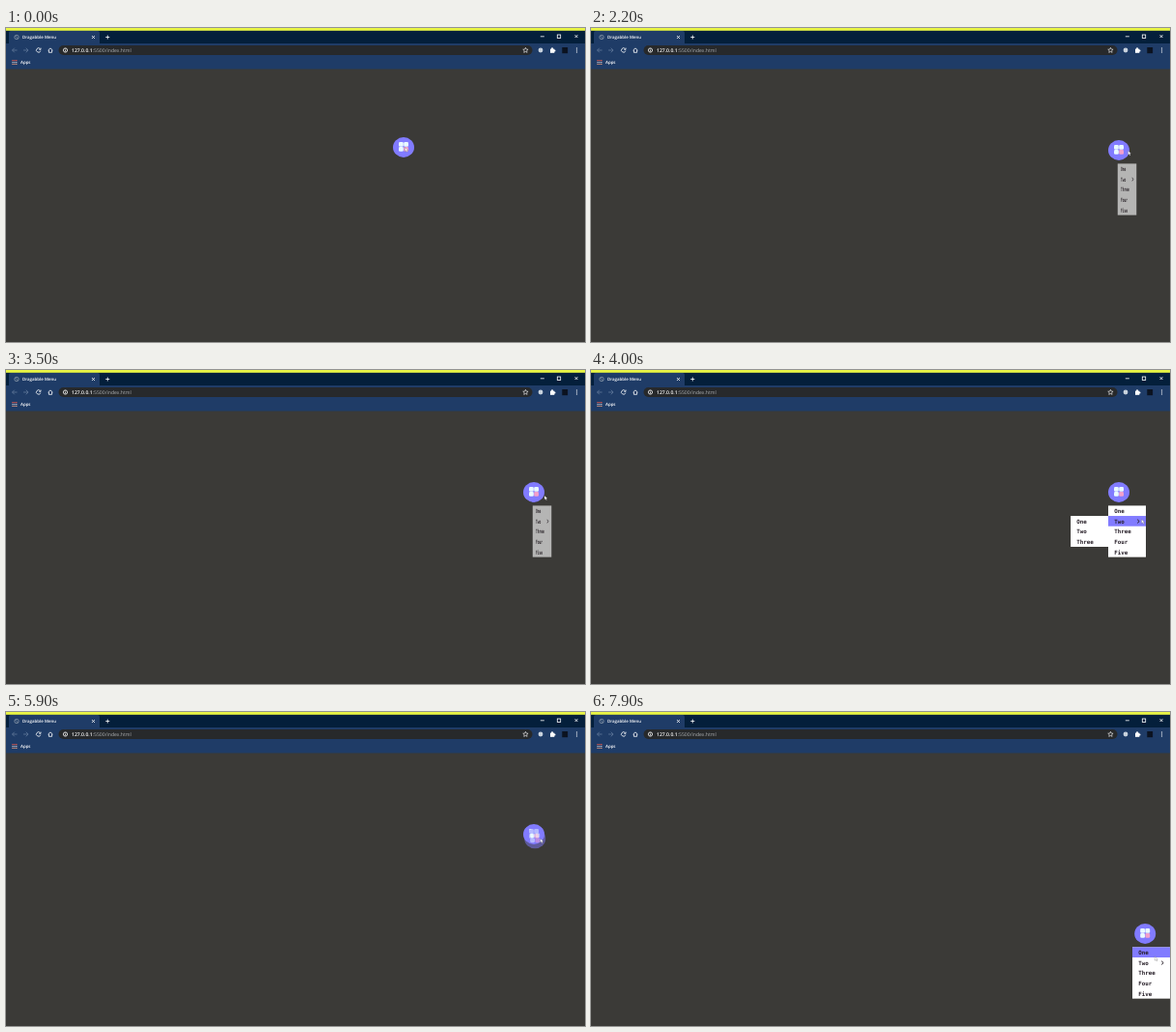
These frames come from a looping animation (600 by 325 pixels, 8 s). An HTML page:

```html
<!DOCTYPE html>
<html lang="en">
<head>
<meta charset="utf-8">
<title>Draggable menu</title>
<style>
  html, body { margin: 0; width: 100%; height: 100%; overflow: hidden; background: #3b3a37; }
  svg { display: block; width: 100vw; height: 100vh; }
  text { font: 600 4.4px "Open Sans", "Noto Sans", sans-serif; fill: #fff; text-rendering: geometricPrecision; }
  .url { font-size: 5.1px; }
  .url tspan { font-weight: 400; fill: #adb0b3; }
  .menu text { font: 700 5.8px "DejaVu Sans Mono", "Noto Sans Mono", monospace; fill: #251d26; }
  .line { fill: none; stroke: #fff; stroke-width: .8; }
</style>
</head>
<body>
<svg viewBox="0 0 600 325">
  <defs>
    <g id="button"><ellipse rx="11" ry="10.4" fill="#817bff"/></g>
    <path id="cross" d="M-2 0H2M0-2V2"/>
    <path id="arrow" d="M2.5 0h-5m2.3-2.3L-2.5 0l2.3 2.3"/>
  </defs>

  <!-- browser window -->
  <rect width="600" height="325" fill="#3b3a37"/>
  <rect width="600" height="17" fill="#041f3b"/>
  <rect width="600" height="2.8" fill="#e9f545"/>
  <rect x="3" y="3" width="94" height="16" rx="2" fill="#1f3c67"/>
  <rect y="16" width="600" height="26.5" fill="#1f3c67"/>

  <g class="line">
    <g stroke="#8796a8"><circle cx="11" cy="9.5" r="2.2"/><path d="M9.5 8l3 3"/></g>
    <use href="#cross" transform="translate(90.5 9.5) rotate(45)"/>
    <use href="#cross" x="105.3" y="9.5"/>
    <path d="M553.8 8.8h4"/>
    <rect x="571.3" y="7" width="3.4" height="3.4"/>
    <use href="#cross" transform="translate(591 8.6) rotate(45)"/>
    <g stroke="#61799b">
      <use href="#arrow" x="9" y="23"/>
      <use href="#arrow" transform="translate(20.5 23) scale(-1 1)"/>
    </g>
    <path d="M35.4 21.6A2.2 2.2 0 1 0 35.8 23.6M36 20.6v1.7h-1.7"/>
    <path d="M43.6 23L46 20.9l2.4 2.1M44.4 22.8v2.5h3.2v-2.5"/>
  </g>
  <rect x="54.5" y="18" width="491" height="10" rx="5" fill="#27292b"/>
  <g class="line">
    <circle cx="61.5" cy="23" r="2.1"/><path d="M61.5 21.6v.6m0 .5v1.6"/>
    <polygon id="star" stroke-width=".6"/>
    <path d="M591.5 20.4v6" stroke-width="1.2" stroke-dasharray="1.2 .8"/>
  </g>
  <circle cx="554" cy="23" r="2.4" fill="#c9d3de"/>
  <g fill="#fff">
    <rect x="564" y="21.6" width="4.3" height="4.2"/><circle cx="566" cy="21.2" r="1"/><circle cx="568.5" cy="23.6" r="1"/>
  </g>
  <rect x="576.3" y="20" width="5.8" height="6.2" fill="#0b1220"/>
  <g stroke-width="1.2" stroke-dasharray="1.2 .7">
    <path d="M6.4 33.7h5" stroke="#ee5f50"/><path d="M6.4 35.6h5" stroke="#c3cbd6"/><path d="M6.4 37.5h5" stroke="#ee9d7d"/>
  </g>
  <text x="17" y="11.1">Dragabble Menu</text>
  <text x="68" y="24.9" class="url">127.0.0.1<tspan>:5500/index.html</tspan></text>
  <text x="15" y="36.9">Apps</text>

  <use id="main" href="#button"/>
  <g id="sub" class="menu"></g>
  <g id="menu" class="menu"></g>
  <use id="ghost" href="#button" opacity=".5"/>
  <path id="cursor" d="M0 0V4.2L1 3.3l.8 1.6.8-.4-.7-1.5H3.1z" fill="#fff" stroke="#444" stroke-width=".25"/>
</svg>

<script>
const LOOP = 8000, ROW = 10.65, WIDTH = 39, PURPLE = '#817bff';
const $ = id => document.getElementById(id);
const clamp = u => Math.max(0, Math.min(1, u));
const smooth = u => u * u * (3 - 2 * u);
const progress = (t, start, end) => clamp((t - start) / (end - start));

// where the button rests, and where the pointer holds it
const start = { x: 412, y: 123.5 }, right = { x: 547, y: 126.5 }, corner = { x: 574.2, y: 229.5 };
const drags = [
  { from: 100, drop: 900, to: right, grab: 1.5 },
  { from: 5800, drop: 6900, to: corner, grab: 5.5 }];

// pointer moves: start, end, button spot, offset from its centre
const moves = [
  [100, 850, right, 1.5, 0],
  [1000, 1300, right, 1.2, -.6],
  [1400, 1800, right, 18, 2],
  [1900, 2100, right, 9.5, .6],
  [3400, 3900, right, 23.5, 28],
  [4500, 5000, right, 5.5, 0],
  [5800, 6600, corner, 5.5, 0],
  [7400, 7900, corner, 10, 23.5]];

function pointer(t) {
  let x = start.x + 1.5, y = start.y;
  for (const [from, to, spot, dx, dy] of moves) {
    const u = smooth(progress(t, from, to));
    x += (spot.x + dx - x) * u;
    y += (spot.y + dy - y) * u;
  }
  return { x, y: y + 3 * Math.sin(Math.PI * progress(t, 100, 850)) };
}

// 0 to 1 and back, 200 ms each way
const shown = (t, open, close) => progress(t, open, open + 200) - progress(t, close, close + 200);

function build(id, labels) {
  $(id).innerHTML = `<rect width="${WIDTH}" height="${labels.length * ROW}" fill="#fff"/>` +
    `<rect class="hover" width="${WIDTH}" height="${ROW}" fill="${PURPLE}"/>` +
    labels.map((label, i) => `<text x="6.3" y="${i * ROW + 7.6}">${label}</text>`).join('');
}
build('menu', ['One', 'Two', 'Three', 'Four', 'Five']);
build('sub', ['One', 'Two', 'Three']);
$('menu').innerHTML += '<path d="M30.2 14.4l2 1.8-2 1.8" fill="none" stroke="#251d26"/>';

for (let i = 0; i < 4; i++) {
  const x = i % 2 * 5.2 - 5, y = (i >> 1) * 5 - 5.4;
  $('button').innerHTML += `<rect x="${x}" y="${y}" width="4.8" height="4.6" rx="1.3" fill="${i < 3 ? '#e9faff' : '#f2a0cb'}"/>`;
}
$('star').setAttribute('points', Array.from({ length: 10 }, (_, i) => {
  const r = i % 2 ? 1.3 : 2.8, a = i * Math.PI / 5;
  return [538.4 + r * Math.sin(a), 23.1 - r * Math.cos(a)];
}).join(' '));

const place = (id, { x, y }) => $(id).setAttribute('transform', `translate(${x} ${y})`);
const show = (el, on) => el.setAttribute('visibility', on ? 'visible' : 'hidden');

function showMenu(id, x, y, open, hover) {
  const g = $(id), mid = WIDTH / 2, mark = g.querySelector('.hover');
  g.setAttribute('display', open > 0 ? 'inline' : 'none');
  g.setAttribute('opacity', Math.min(1, open * 1.25));
  g.setAttribute('transform', `translate(${x + mid} ${y}) scale(${open} 1) translate(${-mid} 0)`);
  mark.setAttribute('y', hover * ROW);
  show(mark, hover >= 0);
}

function draw(t) {
  const hand = pointer(t);
  let button = start, held = null;
  for (const { from, drop, to, grab } of drags) {
    if (t >= drop) button = to;
    else if (t > from) held = { x: hand.x - grab, y: hand.y };
  }
  place('main', button);
  show($('ghost'), held);
  if (held) place('ghost', held);
  place('cursor', hand);

  const left = Math.min(button.x - 11, 600 - WIDTH), top = button.y + 13.9;
  const inside = hand.x > left && hand.x < left + WIDTH;
  const open = shown(t, 2100, 2800) + shown(t, 3400, 5250) + shown(t, 7200, LOOP);
  showMenu('menu', left, top, open, inside ? Math.floor((hand.y - top) / ROW) : -1);
  showMenu('sub', left - WIDTH, top + ROW, shown(t, 3800, 4600), -1);
}

// the screen ticks ten times a second
function tick() {
  draw(Math.floor(performance.now() % LOOP / 100) * 100);
  requestAnimationFrame(tick);
}
tick();
</script>
</body>
</html>
```
